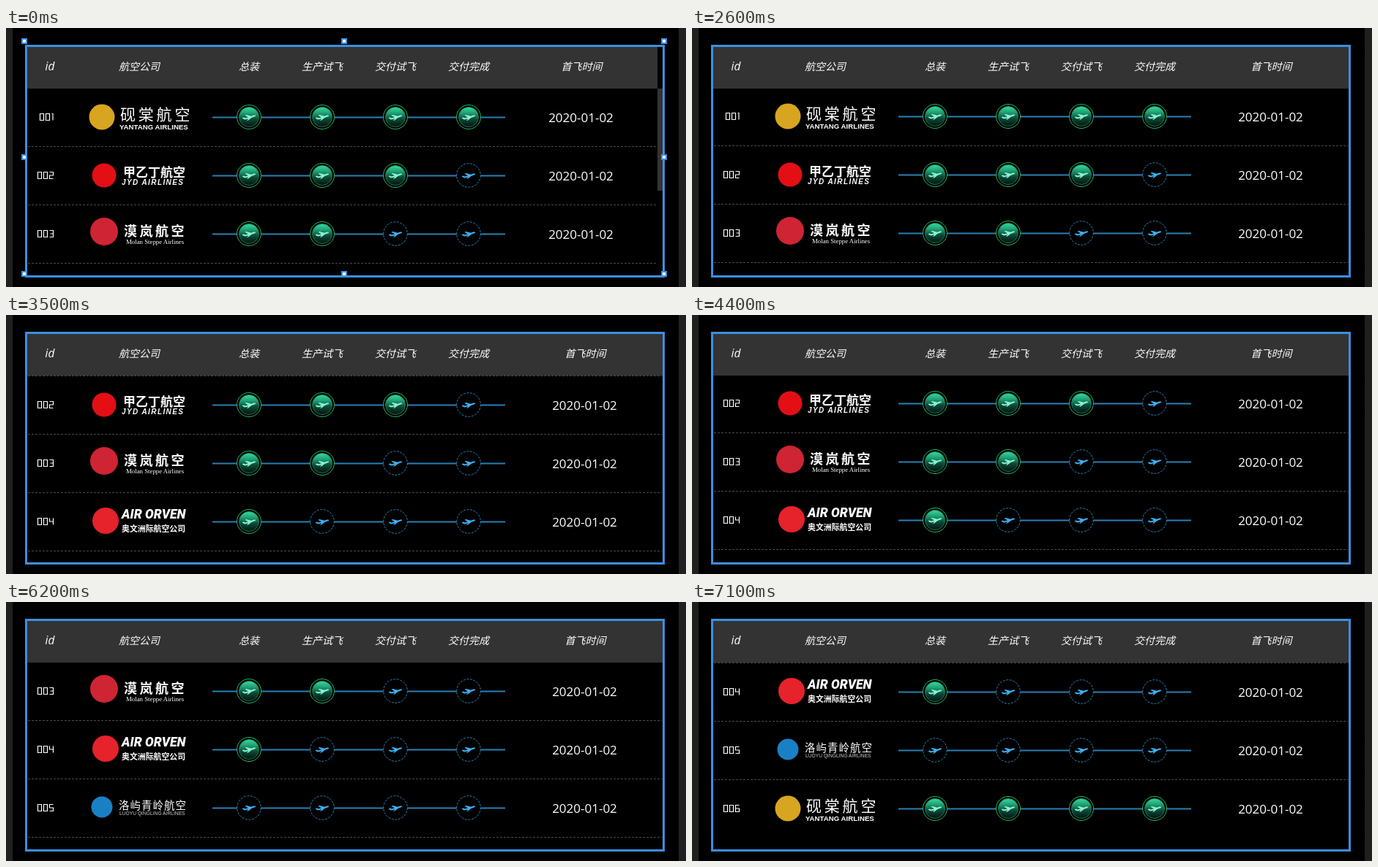
Recreate the animation shown at these times as an HTML page. Size 929 by 355 pixels, loop 8000 ms.

```html
<!DOCTYPE html>
<html lang="zh">
<head>
<meta charset="utf-8">
<title>航班进度</title>
<style>
html, body { margin: 0; width: 100%; height: 100%; overflow: hidden; background: #000; }
svg { display: block; }
text { fill: #fff; font-family: 'Noto Sans CJK SC', 'Noto Sans CJK', sans-serif; }
.head text { font-size: 14px; font-style: italic; text-anchor: middle; }
.head .latin { font: italic 15.5px 'Open Sans', sans-serif; }
.date { font: 500 17px 'Open Sans', sans-serif; text-anchor: middle; }
.arial { font-family: 'Liberation Sans', Arial, sans-serif; }
.serif { font-family: 'Liberation Serif', serif; }
.heavy { font-family: Roboto, sans-serif; font-weight: 900; font-style: italic; }
.bold { font-weight: 700; }
.slant { font-style: italic; }
.dim { fill: #ccc; }
.id path { fill: none; stroke: #fff; stroke-width: 1.2; }
</style>
</head>
<body>
<svg id="stage" width="929" height="355" viewBox="0 0 929 355">
  <defs>
    <pattern id="weave" width="4" height="4" patternUnits="userSpaceOnUse">
      <rect width="4" height="4" fill="#1e1e1e"/>
      <path d="M0 0h1v2h-1zM2 2h1v2h-1z" fill="#262626"/>
    </pattern>
    <linearGradient id="glow" x1="0" y1="0" x2="0" y2="1">
      <stop offset="0" stop-color="#34dca0"/>
      <stop offset=".3" stop-color="#219f75"/>
      <stop offset=".6" stop-color="#0e4a38"/>
      <stop offset="1" stop-color="#03140f"/>
    </linearGradient>
    <clipPath id="view"><rect x="29" y="83" width="868" height="256"/></clipPath>
    <path id="plane" d="M-9.5 1.2L-7.6 .6L-5 1.5L-1.2 .2L-5.6 -2.2L-3.6 -3L3 -1.2L6.6 -2.4C9.4 -3.2 10.2 -1.6 8 -.7L3.4 1L-1 4.6L-3 4.9L-.8 2.2L-5 3.4L-7.2 3.1Z"/>
    <g id="done">
      <circle r="16.5" fill="#000" stroke="#26b464"/>
      <circle r="13.5" fill="url(#glow)" stroke="#1f8a60" stroke-width=".8"/>
      <use href="#plane" fill="#86f5d0"/>
    </g>
    <g id="todo">
      <circle r="16.3" fill="#000" stroke="#2a86bd" stroke-dasharray="3 1.6"/>
      <use href="#plane" fill="#3fb0f5"/>
    </g>
  </defs>
  <rect width="929" height="355"/>
  <path d="M0 0H9V355H0ZM919 0H929V355H919Z" fill="url(#weave)"/>
  <g clip-path="url(#view)"><g id="rows"></g></g>
  <rect x="29" y="26" width="868" height="57" fill="#333"/>
  <g class="head" id="head"></g>
  <g id="bar">
    <rect x="890" y="26" width="7" height="313"/>
    <rect x="890" y="83" width="7" height="140" fill="#333"/>
  </g>
  <rect x="27.5" y="24.5" width="871" height="316" fill="none" stroke="#3c8fe0" stroke-width="3"/>
  <g id="handles" fill="#fff" stroke="#3c8fe0" stroke-width="2"></g>
</svg>
<script>
const $ = id => document.getElementById(id);
const STEPS = [332, 432, 532, 632];
const ROW = 80, FIRST = 122;

const label = (x, y, size, text, cls = '', gap = 0) =>
  `<text x="${x}" y="${y}" font-size="${size}" class="${cls}" letter-spacing="${gap}">${text}</text>`;
const disc = (x, y, r, fill) => `<circle cx="${x}" cy="${y}" r="${r}" fill="${fill}"/>`;

// Airline cells, drawn around the row's centre line
const yantang = disc(131, 0, 17.5, '#d8a520') +
  label(156, 4, 21, '砚棠航空', '', 3.8) +
  label(155, 16.5, 9.7, 'YANTANG AIRLINES', 'arial bold');
const airlines = [
  yantang,
  disc(134, 0, 16.5, '#e30f14') +
    label(160, 2, 17, '甲乙丁航空', 'bold') +
    label(158, 13, 10, 'JYD AIRLINES', 'arial bold slant', 1.4),
  disc(134, -3, 19, '#cf2434') +
    label(161, 3, 18, '漠岚航空', 'bold', 3.5) +
    label(164, 14, 8.8, 'Molan Steppe Airlines', 'serif'),
  disc(136, -1, 18, '#e6222b') +
    label(158, -4, 17.5, 'AIR ORVEN', 'heavy') +
    label(158, 14, 10.9, '奥文洲际航空公司', 'bold'),
  disc(131, -1, 14.5, '#1a80c6') +
    label(154, 2, 14.5, '洛屿青岭航空', '', 1) +
    label(155, 10, 6.7, 'LUOYU QINGLING AIRLINES', 'arial dim'),
  yantang
];
const progress = [4, 3, 2, 1, 0, 4];

// Square digits, 5 by 9
const digits = [
  'M0 0H5V9H0Z', 'M0 0H1.5V9', 'M0 0H5V4.5H0V9H5', 'M0 0H5V9H0M1 4.5H5',
  'M0 0V4.5H5M5 0V9', 'M5 0H0V4.5H5V9H0', 'M5 0H0V9H5V4.5H0'
];
const idCell = n => {
  const left = n === 1 ? 46.5 : 43.5;
  return `<g class="id" role="img" aria-label="00${n}">` + [0, 0, n].map((d, i) =>
    `<path transform="translate(${left + i * 8} -4.5)" d="${digits[d]}"/>`).join('') + '</g>';
};

const row = (airline, i) => `<g transform="translate(0 ${FIRST + i * ROW})">
  ${idCell(i + 1)}${airline}
  <path d="M282 .5H682" stroke="#2a80b4" stroke-width="2"/>
  ${STEPS.map((x, k) => `<use href="#${k < progress[i] ? 'done' : 'todo'}" x="${x}"/>`).join('')}
  <text class="date" x="790.5" y="6.5">2020-01-02</text>
  ${i < 5 ? '<path d="M30 40.5H896" stroke="#4a4a4a" stroke-dasharray="3 2"/>' : ''}
</g>`;
$('rows').innerHTML = airlines.map(row).join('');

const heads = [[60, 'id'], [182, '航空公司'], [332, '总装'], [432, '生产试飞'],
  [532, '交付试飞'], [632, '交付完成'], [791.5, '首飞时间']];
$('head').innerHTML = heads.map(([x, s]) =>
  `<text x="${x}" y="58"${s === 'id' ? ' class="latin"' : ''}>${s}</text>`).join('');

$('handles').innerHTML = [25, 462, 899].flatMap(x => [18, 177, 337].map(y =>
  x === 462 && y === 177 ? '' : `<rect x="${x - 3}" y="${y - 3}" width="6" height="6"/>`)).join('');

// Scroll moves: start time, from, to
const LOOP = 8000, TICK = 100, MOVE = 930;
const moves = [[2530, 0, 79], [4302, 79, 159], [6127, 159, 239]];
const swing = p => .5 - Math.cos(Math.PI * p) / 2;

function scrollAt(t) {
  let y = 0;
  for (const [start, from, to] of moves) {
    if (t >= start) y = from + (to - from) * swing(Math.min(1, (t - start) / MOVE));
  }
  return Math.floor(y + 1e-6);
}

const timeCells = [...document.querySelectorAll('.date'), $('head').lastElementChild];
const show = (el, on) => el.setAttribute('visibility', on ? 'visible' : 'hidden');

function draw(now) {
  // The picture advances in tenths of a second
  const t = Math.floor((now % LOOP) / TICK) * TICK;
  const narrow = t < 700;
  show($('handles'), t < 500);
  show($('bar'), narrow);
  for (const el of timeCells) el.setAttribute('transform', `translate(${narrow ? -5 : 0} 0)`);
  $('rows').setAttribute('transform', `translate(0 ${-scrollAt(t)})`);
}

const begin = performance.now();
function frame() {
  draw(performance.now() - begin);
  requestAnimationFrame(frame);
}
frame();
</script>
</body>
</html>
```
